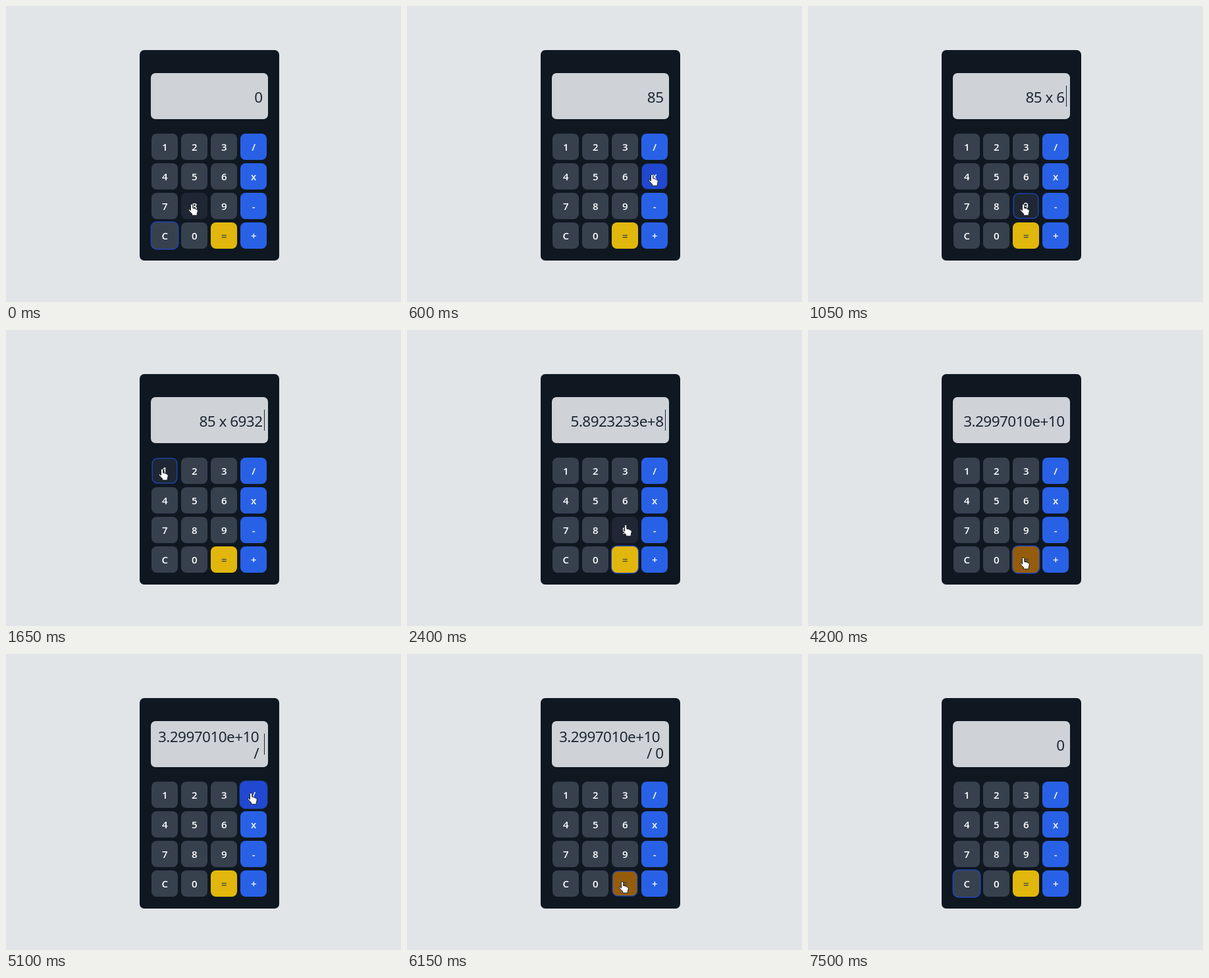
An HTML page for the animation above (7650 ms loop, 600 by 450 pixels).

```html
<!DOCTYPE html>
<html lang="en">
<head>
<meta charset="utf-8">
<title>Calculator</title>
<style>
  html, body { margin: 0; width: 100%; height: 100%; overflow: hidden; background: #e2e5e8; }
  #stage { position: relative; width: 600px; height: 450px; overflow: hidden; font-family: "Noto Sans", "Open Sans", sans-serif; }
  #stage > * { position: absolute; box-sizing: border-box; }
  #panel { left: 203px; top: 67px; width: 212px; height: 320px; border-radius: 7px; background: #0f1721; }
  #display {
    left: 220px; top: 102px; width: 178px; height: 70px; padding: 2px 8.5px 0 0;
    border-radius: 7px; background: #cfd3d8; color: #1f2733;
    display: flex; align-items: center; justify-content: flex-end;
    font-size: 22.5px; line-height: 25px; letter-spacing: -.024em; text-align: right; white-space: pre;
  }
  #caret { left: 392px; top: 121px; width: 1.4px; height: 32px; background: #1f2733; }
  .key {
    width: 40px; height: 40px; border-radius: 8px;
    background: #37414e; color: #fff;
    font: 600 15px/40px "Open Sans", "Noto Sans", sans-serif; text-align: center;
  }
  .key.hover { background: #1e2733; }
  .op { background: #2961e6; }
  .op.hover { background: #2148d0; }
  .equals { background: #e1b70d; color: #37414e; }
  .equals.hover { background: #955d0b; }
  .focus { box-shadow: 0 0 0 1.4px #2148b8; }
  .down { transform: scale(.91); }
  #cursor { left: 0; top: 0; width: 1px; height: 1px; overflow: visible; }
  #cursor path { fill: #fff; stroke: #151a20; stroke-width: .9; stroke-linejoin: round; }
  #hand { transform: scale(1.1); }
</style>
</head>
<body>
<div id="stage">
  <div id="panel"></div>
  <div id="display"></div>
  <div id="caret"></div>
  <svg id="cursor">
    <path id="hand" d="M-1.6 9V1.4a1.5 1.5 0 0 1 3 0V5.5q3 0 6 2.2 1 .6 .8 2.3l-.9 3.2v2.3h-7v-2l-4.5-4.7q-1-1.6 .6-2z"/>
    <path id="arrow" d="M0 0V13l3-3 2 5 2-1-2-4h4z"/>
  </svg>
</div>
<script>
// One character per step: a key is pressed, "." travels to the next key,
// "_" rests on the last key, "^" waits on the next one.
const SCRIPT = "^85.x6.9.32145.=..x_.5.6_..=_.../__..^^0.=_____C_";
const STEP = 150, STEPS = SCRIPT.length + 2;
const BLINK = 690, BLINK_START = 190;
const SIZE = 40, PITCH = 45;
const EXIT = { x: 188, y: 8 };
const $ = id => document.getElementById(id);
const isOperator = label => "/x-+".includes(label);
const isPress = mark => !"._^".includes(mark);

const keys = {};
[..."123/456x789-C0=+"].forEach((label, i) => {
  const el = document.createElement("div");
  const x = 221.2 + PITCH * (i % 4), y = 194.2 + PITCH * Math.floor(i / 4);
  el.className = "key" + (isOperator(label) ? " op" : label === "=" ? " equals" : "");
  el.textContent = label;
  el.style.left = x + "px";
  el.style.top = y + "px";
  $("stage").insertBefore(el, $("cursor"));
  keys[label] = { el, x, y };
});

function calculate(text) {
  const [a, op, b] = text.split(" ");
  const n = { "x": a * b, "/": a / b, "+": +a + +b, "-": a - b }[op];
  return String(n).length > 8 ? n.toPrecision(8) : String(n);
}

function apply(text, key) {
  if (key === "C") return "0";
  if (key === "=") return calculate(text);
  if (isOperator(key)) return text + " " + key + " ";
  return text === "0" ? key : text + key;
}

function tipOn(label) {
  return { x: keys[label].x + SIZE / 2 - 4, y: keys[label].y + SIZE / 2 - 3 };
}

function pointerAt(step) {
  if (step >= SCRIPT.length) return step === SCRIPT.length ? EXIT : null;
  let from = step, to = step;
  while (from > 0 && SCRIPT[from] === ".") from--;
  while (SCRIPT[to] === ".") to++;
  const k = to > from ? (step - from) / (to - from) : 0;

  let last = from, next = to;
  while (SCRIPT[last] === "_") last--;
  while (SCRIPT[next] === "^") next++;
  if (from === to) return tipOn(SCRIPT[SCRIPT[step] === "^" ? next : last]);

  // the hand rises or falls first and drifts sideways later
  const a = tipOn(SCRIPT[last]), b = tipOn(SCRIPT[next]);
  return { x: a.x + (b.x - a.x) * k * k, y: a.y + (b.y - a.y) * k * (2 - k) };
}

function render(step) {
  let text = "0", focus = "C", down = null;
  [...SCRIPT.slice(0, step + 1)].forEach((mark, at) => {
    if (!isPress(mark)) return;
    focus = mark;
    if (at === step) down = mark;
    else text = apply(text, mark);
  });
  // a long first operand pushes the operator to a second line
  $("display").textContent = text.replace(/^(\S{12,} )/, "$1\n");

  const blink = (step * STEP - BLINK_START + BLINK) % BLINK;
  $("caret").style.visibility = blink < BLINK / 2 ? "visible" : "hidden";

  const tip = pointerAt(step);
  const within = (v, edge) => v >= edge && v < edge + SIZE;
  let hovering = false;
  for (const [label, { el, x, y }] of Object.entries(keys)) {
    const hover = !!tip && within(tip.x, x) && within(tip.y, y);
    hovering = hovering || hover;
    el.classList.toggle("hover", hover);
    el.classList.toggle("focus", label === focus);
    el.classList.toggle("down", label === down);
  }

  $("cursor").style.display = tip ? "block" : "none";
  if (tip) $("cursor").style.transform = `translate(${tip.x}px, ${tip.y}px)`;
  $("hand").style.display = hovering ? "inline" : "none";
  $("arrow").style.display = hovering ? "none" : "inline";
}

const start = performance.now();
let shown = -1;
function tick() {
  const step = Math.floor((performance.now() - start) / STEP) % STEPS;
  if (step !== shown) render(shown = step);
  requestAnimationFrame(tick);
}
tick();
</script>
</body>
</html>
```
